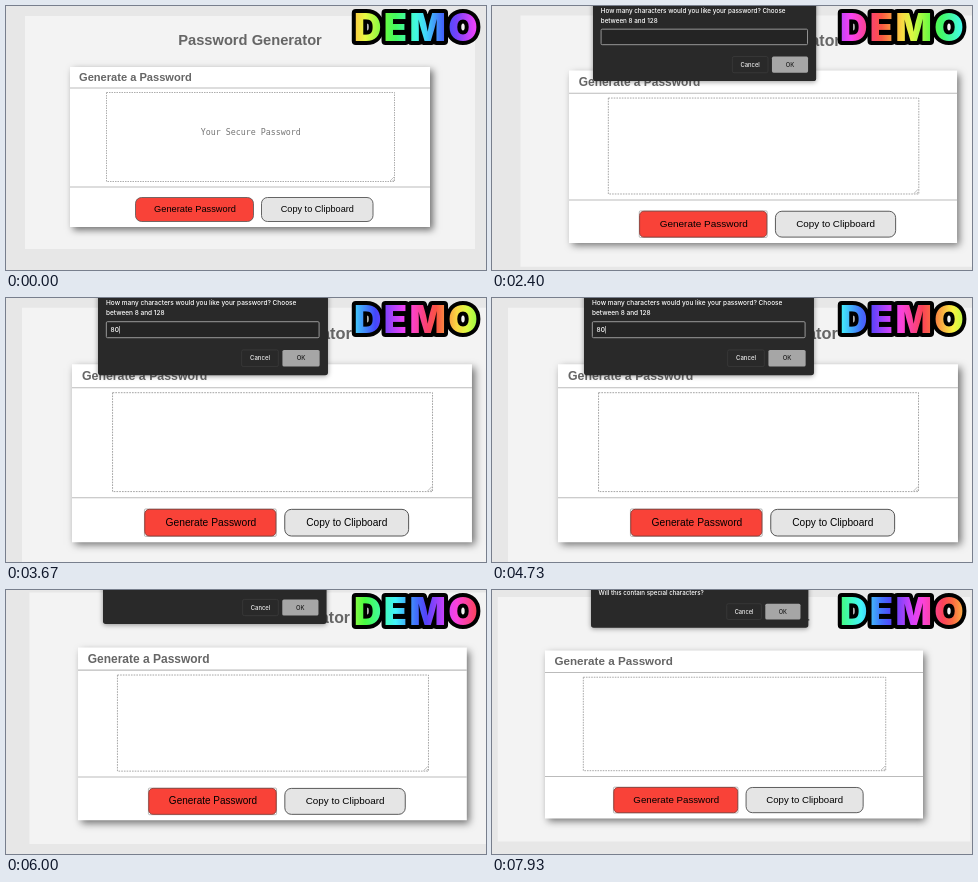
Animation of 480 by 264 pixels, one loop 8 s. Source, as an HTML page with a canvas:

```html
<!DOCTYPE html>
<html lang="en">
<head>
<meta charset="utf-8">
<title>Password Generator</title>
<style>
  html, body { margin: 0; width: 100%; height: 100%; overflow: hidden; background: #e7e7e7; }
  canvas { display: block; width: 480px; height: 264px; }
</style>
</head>
<body>
<canvas></canvas>
<script>
const LOOP = 8000;
const HUE_PERIOD = 1025;
const HUE_SPAN = 255;
const SANS = '"Liberation Sans", Arial, sans-serif';
const UI = 'Inter, sans-serif';
const MONO = '"DejaVu Sans Mono", monospace';

// Each scene is a still camera view: zoom, page offset and dialog position.
const scenes = [
  { from: 0, zoom: 1, x: 0, y: 0 },
  { from: 1500, zoom: 1.078, x: 8, y: -1.2, dialogX: 101, prompt: true, typed: '' },
  { from: 3200, zoom: 1.111, x: -5.1, y: -1.4, dialogX: 92, prompt: true, typed: '80' },
  { from: 4900, zoom: 1.08, x: 2.9, y: -8.4, dialogX: 97, question: 'Will this contain numerics?' },
  { from: 6600, zoom: 1.05, x: -14.2, y: -3.6, dialogX: 99, question: 'Will this contain special characters?' }
];

const canvas = document.querySelector('canvas');
const ctx = canvas.getContext('2d');
const ratio = window.devicePixelRatio || 1;
canvas.width = 480 * ratio;
canvas.height = 264 * ratio;

function view(zoom, x, y) {
  ctx.setTransform(zoom * ratio, 0, 0, zoom * ratio, x * ratio, y * ratio);
}

function box(x, y, w, h, fill, stroke, radius = 0, lineWidth = 1) {
  ctx.beginPath();
  ctx.roundRect(x, y, w, h, radius);
  if (fill) { ctx.fillStyle = fill; ctx.fill(); }
  if (stroke) { ctx.strokeStyle = stroke; ctx.lineWidth = lineWidth; ctx.stroke(); }
}

function label(text, x, y, font, color, align = 'left') {
  ctx.font = font;
  ctx.fillStyle = color;
  ctx.textAlign = align;
  ctx.fillText(text, x, y);
}

function drawPage(scene) {
  const active = scene.dialogX !== undefined;
  box(19, 10, 450, 233, '#f3f3f3');
  label('Password Generator', 244, 38.5, `bold 14.7px ${SANS}`, '#666', 'center');

  ctx.save();
  ctx.shadowColor = 'rgba(0,0,0,.55)';
  ctx.shadowBlur = 7 * scene.zoom * ratio;
  ctx.shadowOffsetX = ctx.shadowOffsetY = 3 * scene.zoom * ratio;
  box(64, 61, 360, 160, '#fff');
  ctx.restore();

  label('Generate a Password', 73, 75.3, `bold 11.1px ${SANS}`, '#666');
  box(64, 81.5, 360, 1, '#bbb');
  box(64, 180.5, 360, 1, '#bbb');

  ctx.setLineDash([1.5, 1]);
  box(100.5, 86.5, 288, 89, null, '#999', 0, 0.8);
  ctx.setLineDash([]);
  ctx.beginPath();
  ctx.moveTo(384, 175); ctx.lineTo(388, 171);
  ctx.moveTo(386.5, 175); ctx.lineTo(388, 173.5);
  ctx.strokeStyle = '#aaa';
  ctx.lineWidth = 0.7;
  ctx.stroke();
  if (!active) label('Your Secure Password', 244.7, 129, `8.3px ${MONO}`, '#757575', 'center');

  if (active) box(129.2, 191.2, 118.6, 24.6, null, '#aaa', 1, 0.8);
  box(129.5, 191.5, 118, 24, '#f94238', active ? '#8a3a34' : '#555', active ? 4 : 6, 0.8);
  box(255.5, 191.5, 111.5, 24, '#e5e5e5', '#555', 6, 0.9);
  label('Generate Password', 189, 206.3, `9.25px ${SANS}`, '#000', 'center');
  label('Copy to Clipboard', 311.3, 206.3, `9.15px ${SANS}`, '#000', 'center');
}

function drawDialog(scene) {
  const bottom = scene.prompt ? 70.8 : 39.3;
  const font = `500 5.85px ${UI}`;
  ctx.save();
  ctx.shadowColor = 'rgba(0,0,0,.4)';
  ctx.shadowBlur = 5 * ratio;
  ctx.shadowOffsetY = ratio;
  box(0, -30, 207, bottom + 30, '#292929', null, 2.5);
  ctx.restore();

  if (scene.prompt) {
    label('How many characters would you like your password? Choose', 7.2, 7.6, font, '#fff');
    label('between 8 and 128', 7.2, 16.7, font, '#fff');
    box(7.5, 22.6, 191.5, 14.4, '#242424', '#999', 1, 0.9);
    label(scene.typed, 11.3, 32, font, '#fff');
    if (scene.typed) box(19.1, 26.5, 0.6, 6.8, '#ddd');
  } else {
    label(scene.question, 7.2, 8.2, font, '#fff');
  }

  const top = bottom - 22.8;
  box(129.3, top, 33, 15, '#292929', '#3c3c3c', 1.5, 0.7);
  box(166, top, 33.5, 15, '#a6a6a6', null, 1.5);
  label('Cancel', 145.8, top + 9.5, `500 5.4px ${UI}`, '#eee', 'center');
  label('OK', 182.7, top + 9.5, `500 5.4px ${UI}`, '#222', 'center');
}

function drawBadge(time) {
  const startHue = 45 - 360 * time / HUE_PERIOD;
  const rainbow = ctx.createLinearGradient(349, 0, 471, 0);
  for (let i = 0; i <= 12; i++) {
    const hue = ((startHue + HUE_SPAN * i / 12) % 360 + 360) % 360;
    rainbow.addColorStop(i / 12, `hsl(${hue}, 95%, 62%)`);
  }
  ctx.save();
  ctx.letterSpacing = '2.4px';
  ctx.font = `900 38px ${UI}`;
  ctx.textAlign = 'center';
  ctx.lineJoin = 'round';
  ctx.lineWidth = 8;
  ctx.strokeStyle = '#000';
  ctx.strokeText('DEMO', 411, 35);
  ctx.fillStyle = rainbow;
  ctx.fillText('DEMO', 411, 35);
  ctx.restore();
}

function draw(now) {
  const time = now % LOOP;
  const scene = scenes.findLast(s => time >= s.from);
  view(1, 0, 0);
  box(0, 0, 480, 264, '#e7e7e7');
  view(scene.zoom, scene.x, scene.y);
  drawPage(scene);
  if (scene.dialogX !== undefined) {
    view(scene.zoom, scene.dialogX, scene.y);
    drawDialog(scene);
  }
  view(1, 0, 0);
  drawBadge(time);
}

const start = performance.now();
function tick() {
  draw(performance.now() - start);
  requestAnimationFrame(tick);
}
tick();
</script>
</body>
</html>
```
